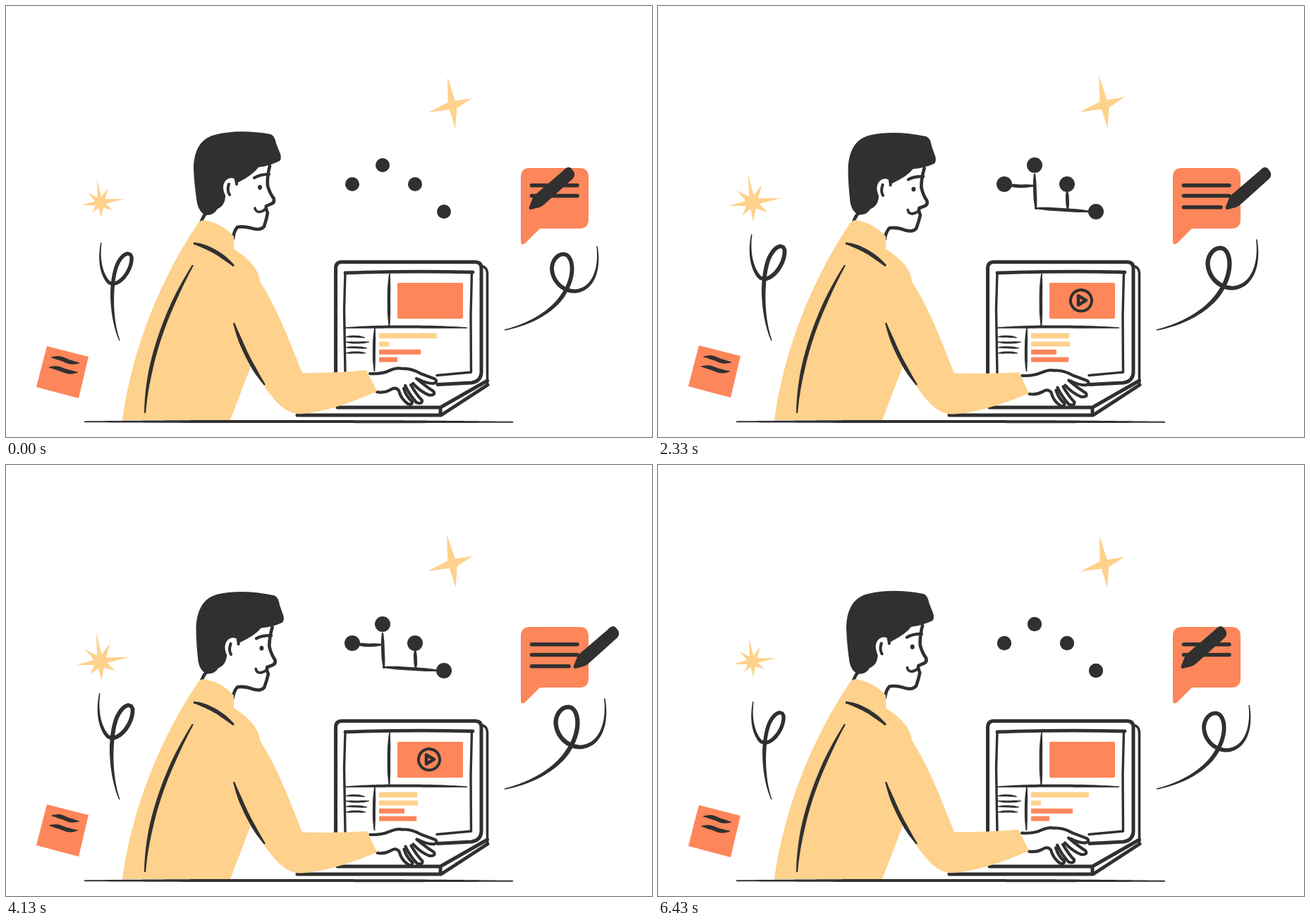
These frames come from a looping animation (916x612 px, 6510 ms). An HTML page:

```html
<!DOCTYPE html>
<html lang="en">
<head>
<meta charset="utf-8">
<title>Working at a laptop</title>
<style>
html, body { margin: 0; width: 100%; height: 100%; overflow: hidden; background: #fff; }
svg { display: block; width: 916px; height: 612px; }
.ink { fill: none; stroke: #303030; stroke-linecap: round; stroke-linejoin: round; }
.dark { fill: #303030; }
.sun { fill: #fed18c; }
.coral { fill: #fd865a; }
.paper { fill: #fff; }
</style>
</head>
<body>
<svg id="stage" viewBox="0 0 916 612">
  <path id="starBig" class="sun"/>
  <path id="starSmall" class="sun"/>
  <g id="curlLeft"></g>
  <g id="curlRight"></g>

  <g id="note">
    <path class="coral" d="M58 483L117 498L103 557L43 541Z"/>
  </g>

  <g id="tree" class="dark"></g>
  <g id="dots" class="dark"></g>

  <path class="coral" d="M743 230H813Q826 230 826 243V303Q826 316 813 316H757L736 337Q730 341 730 334V243Q730 230 743 230Z"/>
  <g class="ink" stroke-width="5.5">
    <path d="M745.5 254.8H810M745.5 269.5H810"/>
    <path id="written"/>
  </g>
  <path id="pen" class="dark" d="M742 285L748 270L790 234Q797 226 802 231L805 235Q808 240 804 245L764 281Q760 285 756 286L744 289Q741 289 742 285Z"/>

  <g id="laptop">
    <g class="ink" stroke-width="5">
      <path class="paper" d="M467.500 527V373Q467.500 363.500 476 363.500H665Q674 363.500 674 372V521Q673 533 660 535L612 537.500"/>
      <path d="M682.500 532L616 570H470M683 538L617 581H413M616 570V581"/>
    </g>
    <path class="ink" stroke-width="3.600" d="M677 370Q682.500 373 682.500 380V538"/>
    <path class="ink" stroke-width="4.800" d="M481 379Q570 376 662 378"/>
    <path class="ink" stroke-width="3.400" d="M481 379L479.500 430L481 522M660.500 379L659 440L659.500 520L611 524.500"/>
    <rect class="coral" x="555" y="393" width="93" height="51" rx="2"/>
    <g id="play">
      <path id="ring" class="ink" stroke-width="4" pathLength="1" stroke-dasharray="1 1" d="M603 403.500A15 15 0 1 1 597 403.500Q600 402.500 603 404"/>
      <path id="arrow" class="ink" stroke-width="4.600" d="M596 411.500V424.500L607 418Z"/>
    </g>
    <g id="bars"></g>
  </g>

  <g id="hand">
    <path class="paper" d="M514 522Q532 523 543 518T562 514Q574 513 588 521L609 529Q614 534 606 537L598 536L608 549Q609 554 598 553L590 560Q591 567 582 564L576 566L566 562L553 543Q540 550 522 549Z"/>
    <g class="ink" stroke-width="4.200">
      <path d="M516 522Q532 523 543 518T562 515Q574 514 588 522L608 529.500Q613 534 606 536Q596 536 585 530"/>
      <path d="M582 529Q595 540 606 547Q610 553 600 552.500Q588 548 577 536"/>
      <path d="M574 538Q582 552 590 560Q590 566 582 563Q572 552 566 539"/>
      <path d="M564 543Q567 554 576 562Q576 567 570 565Q560 558 557 546Q552 540 545 545Q536 550 526 548"/>
    </g>
  </g>

  <g id="head">
    <path class="paper" d="M283 294L275 308L322 330L327 315L358 318L369 300L368 284L380 276L371 250L374 226L290 230Z"/>
    <path class="dark" d="M266 232C266 205 276 188 296 183C320 177 345 177 375 182Q381 184 383 195L389 210Q391 217 388 220Q374 227 358 229Q350 240 330 250L311 266Q312 283 300 288Q295 297 284 297Q274 294 271 280Q267 255 266 232Z"/>
    <path class="paper" d="M327 250C324 240 308 243 308 258C309 273 320 279 327 272Z"/>
    <path class="ink" stroke-width="4" d="M316 253Q313 262 317 268M326 247Q327 250 327 253"/>
    <path class="ink" stroke-width="4.600" d="M283 295Q280 298 277 306M374 227Q370 243 371 255Q374 266 379.500 273Q381.500 279 376 281L369 284Q368 288 371 294Q369 304 366 313Q361 319 350 316Q338 312 328 314Q323 320 322 330"/>
    <path class="ink" stroke-width="4.200" d="M352 244Q360 239 373 239"/>
    <ellipse class="dark" cx="360" cy="257.500" rx="3" ry="3.400"/>
    <path class="ink" stroke-width="3.600" d="M353 287Q354 292 359 292.500Q364 292 368 288"/>
  </g>

  <path id="body" class="sun"/>
  <g id="strokes" class="dark"></g>
</svg>
<script>
const NS = 'http://www.w3.org/2000/svg';
const $ = id => document.getElementById(id);
const set = (el, name, value) => el.setAttribute(name, value);
const lerp = (a, b, k) => a + (b - a) * k;

function add(parent, tag, attrs) {
  const el = document.createElementNS(NS, tag);
  for (const key in attrs) set(el, key, attrs[key]);
  parent.appendChild(el);
  return el;
}

// Outline of a tapered pen stroke along the first part of a path.
const probe = document.createElementNS(NS, 'path');
function brush(d, width, thin = 0.25, part = 1) {
  if (part <= 0.01) return '';
  set(probe, 'd', d);
  const len = probe.getTotalLength() * part;
  const steps = Math.max(12, Math.round(len / 4));
  const left = [], right = [];
  for (let i = 0; i <= steps; i++) {
    const u = i / steps, at = u * len;
    const p = probe.getPointAtLength(at);
    const a = probe.getPointAtLength(Math.max(0, at - 0.5));
    const b = probe.getPointAtLength(at + 0.5);
    const dx = b.x - a.x, dy = b.y - a.y, n = Math.hypot(dx, dy) || 1;
    const half = width / 2 * (thin + (1 - thin) * Math.min(1, 1.3 * Math.sin(Math.PI * u)));
    left.push([p.x - dy / n * half, p.y + dx / n * half]);
    right.unshift([p.x + dy / n * half, p.y - dx / n * half]);
  }
  return 'M' + left.concat(right).map(q => q.map(v => v.toFixed(2)).join(' ')).join('L') + 'Z';
}
const paint = (parent, d, width, thin) => add(parent, 'path', { class: 'dark', d: brush(d, width, thin) });

// Star around the origin: tips listed clockwise, notches placed between them.
function star(tips, radius) {
  const pts = [];
  tips.forEach((tip, i) => {
    const next = tips[(i + 1) % tips.length];
    const a = Math.atan2(tip[1], tip[0]);
    let turn = Math.atan2(next[1], next[0]) - a;
    if (turn < 0) turn += 2 * Math.PI;
    const mid = a + turn / 2;
    pts.push(tip, [radius * Math.cos(mid), radius * Math.sin(mid)]);
  });
  return 'M' + pts.map(p => p.join(' ')).join('L') + 'Z';
}

set($('starBig'), 'd', star([[-7, -40], [28, -10], [4, 33], [-34, 10]], 7.5));
set($('starSmall'), 'd', star([[-5, -33], [11, -21], [33, -5], [17, 11], [1, 22], [-12, 15], [-27, 4], [-18, -14]], 8));

paint($('curlLeft'), 'M135 336C131 360 135 380 145 392C158 403 180 375 178 356C175 345 160 355 155 375C148 400 149 445 161 475', 5.4);
paint($('curlRight'), 'M707 460C748 451 779 430 792 407C804 388 806 365 797 355C788 347 774 358 774 373C775 393 792 406 808 405C832 402 843 375 838 341', 5.8);

for (const d of ['M64 499Q76 499 84 503T104 507', 'M61 513Q72 513 81 517T102 520']) paint($('note'), d, 6, 0.15);

for (const [d, w] of [
  ['M544 380Q542 410 543.500 456', 4.4], ['M480 457Q560 454 654 457', 4], ['M523 457Q521 490 522.500 519', 4],
  ['M482 470Q495 468 509 471', 3], ['M481 477Q497 479 515 477', 3],
  ['M482 485Q495 484 512 486', 3], ['M482 493Q496 491 510 493', 3]
]) paint($('laptop'), d, w, 0.4);

for (const [d, w, thin] of [
  ['M265 368C230 428 201 500 197 578', 5.4, 0.4], ['M266 337Q295 343 323 369', 5.8, 0.5],
  ['M323 450Q340 501 367 538', 5.6, 0.4], ['M111 590.300Q410 589.500 719 590.800', 4, 0.45]
]) paint($('strokes'), d, w, thin);

const dots = [[491, 253], [534, 226], [580, 253], [621, 292]].map(([cx, cy]) => add($('dots'), 'circle', { cx, cy }));
const twigs = ['M493 254L515 256L534 255', 'M534 238Q534 265 536 289', 'M534 287Q570 289 614 292', 'M580 262L581 289']
  .map(d => [d, add($('tree'), 'path', {})]);

// y, height, class, right end at the start and at the half loop
const bars = [[464.5, 7.5, 'sun', 611, 577], [476.5, 7, 'sun', 543, 593], [487.8, 7, 'coral', 588, 560], [498.6, 7, 'coral', 555, 588]]
  .map(([y, height, cls, from, to]) => ({ from, to, el: add($('bars'), 'rect', { x: 529, y, height, class: cls }) }));

const LOOP = 6510, SPAN = 6500, TICK = 50;
const wave = (t, cycles) => (1 - Math.cos(2 * Math.PI * cycles * t / SPAN)) / 2;
function ease(s, from, to) {
  const x = Math.min(1, Math.max(0, (s - from) / (to - from)));
  return x * x * (3 - 2 * x);
}
function track(s, keys) {
  let i = 1;
  while (i < keys.length - 1 && s > keys[i][0]) i++;
  const [a, b] = [keys[i - 1], keys[i]];
  return lerp(a[1], b[1], Math.min(1, (s - a[0]) / (b[0] - a[0])));
}

function drawBody(k) {
  const y = (a, b) => lerp(a, b, k).toFixed(2);
  set($('body'), 'd',
    'M165 588C175 510 208 405 270 312Q274 304 281 304Q305 308 323 327V345Q358 367 360 391C385 430 402 476 ' +
    `420 ${y(521, 524)}Q470 ${y(521.5, 525)} ${y(511, 517)} ${y(517, 532)}L${y(526, 525)} ${y(547, 562)}` +
    `Q465 ${y(575, 579)} 420 ${y(579, 581)}Q398 582 375 552Q357 528 347 512L318 588Z`);
}

function render(t) {
  const s = t <= SPAN / 2 ? t : SPAN - t; // the second half mirrors the first
  const beat = wave(t, 3), sway = wave(t, 2), glint = wave(t, 4), slow = wave(t, 1);

  set($('starBig'), 'transform', `translate(${lerp(633, 632, beat)} ${lerp(141, 126, beat)}) rotate(${-12.5 * beat}) scale(${1 + 0.47 * beat})`);
  set($('starSmall'), 'transform', `translate(134 279) scale(${1 + 0.24 * glint})`);
  set($('note'), 'transform', `translate(0 ${-16.2 * beat})`);

  const grow = (x, y, k) => `translate(${x} ${y}) scale(${k}) translate(${-x} ${-y})`;
  set($('curlLeft'), 'transform', grow(161, 475, 1 + 0.145 * sway));
  set($('curlRight'), 'transform', grow(707, 460, 1 + 0.14 * sway));

  const r = track(s, [[0, 10], [900, 12.4], [1500, 12.4], [2350, 11], [3100, 11.6], [3250, 11.6]]);
  dots.forEach(dot => set(dot, 'r', r));
  twigs.forEach(([d, el], i) => set(el, 'd', brush(d, 4.8, 0.45, ease(s, 150 + i * 80, 600 + i * 80))));

  const write = ease(s, 50, 1000) * (1 - ease(s, 2350, 3080));
  set($('pen'), 'transform', `translate(${63 * write} 0)`);
  set($('written'), 'd', write > 0.03 ? `M745.500 285.800H${lerp(745.5, 798, write)}` : '');

  bars.forEach(b => set(b.el, 'width', lerp(b.from, b.to, slow) - 529));
  const ring = ease(s, 1600, 2150);
  set($('play'), 'visibility', ring > 0 ? 'visible' : 'hidden');
  set($('ring'), 'stroke-dashoffset', 1 - ring);
  set($('arrow'), 'opacity', ease(s, 1800, 2200));

  const nod = Math.min(1, s / 700) * (1 - ease(s, 1500, 2750));
  set($('head'), 'transform', `rotate(${9.5 * nod} 295 319)`);

  const drop = Math.pow(beat, 0.6);
  drawBody(drop);
  set($('hand'), 'transform', `translate(${2 * drop} ${14 * drop}) rotate(${-18.5 * Math.pow(beat, 1.6)} 520 533)`);
}

const start = performance.now();
function loop() {
  const ms = (performance.now() - start) % LOOP;
  const tick = Math.min(129, 2 * Math.floor(ms / 100) + (ms % 100 >= 30 ? 1 : 0));
  render(tick * TICK);
  requestAnimationFrame(loop);
}
loop();
</script>
</body>
</html>
```
